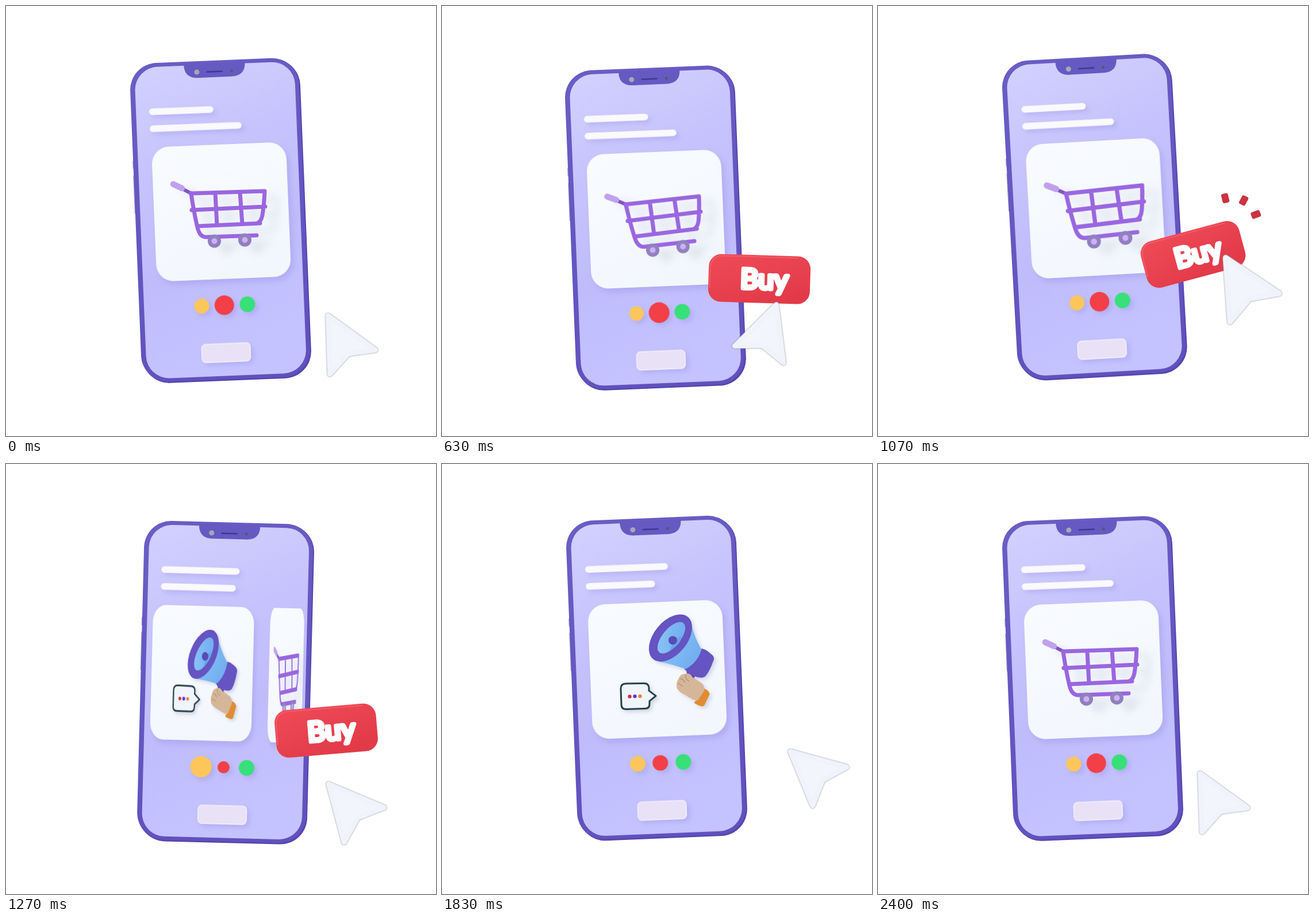
An HTML page for the animation above (2430 ms loop, 748 by 748 pixels).

```html
<!DOCTYPE html>
<html lang="en">
<head>
<meta charset="utf-8">
<title>Mobile shop</title>
<style>
  html, body { margin: 0; width: 100%; height: 100%; overflow: hidden; background: #fff; }
  svg { display: block; width: 100vw; height: 100vh; }
  .raised { filter: drop-shadow(5px 5px 4px #7f78d840); }
  .card { filter: drop-shadow(5px 7px 5px #7f78d840); }
  .art { filter: drop-shadow(22px 12px 7px #8d93b030); }
  .soft { filter: drop-shadow(4px 4px 3px #8d93b050); }
  .cursor { filter: drop-shadow(0 0 .8px #666b80); }
  .line { fill: none; stroke-linecap: round; stroke-linejoin: round; }
  text { font: 400 48px Lato, "Open Sans", sans-serif; letter-spacing: .5px; }
</style>
</head>
<body>
<svg viewBox="0 0 748 748">
  <defs>
    <linearGradient id="screen" x1=".1" y1="0" x2=".3" y2="1">
      <stop offset="0" stop-color="#d2d0fe"/>
      <stop offset=".35" stop-color="#c5c2fd"/>
      <stop offset=".65" stop-color="#bfbcfb"/>
      <stop offset="1" stop-color="#c4c3ff"/>
    </linearGradient>
    <linearGradient id="frame" x1="0" y1="0" x2=".2" y2="1">
      <stop offset="0" stop-color="#6a5dc4"/>
      <stop offset="1" stop-color="#6151be"/>
    </linearGradient>
    <linearGradient id="paper" x1="0" y1="0" x2=".4" y2="1">
      <stop offset="0" stop-color="#f9fbff"/>
      <stop offset="1" stop-color="#f3f7fd"/>
    </linearGradient>
    <linearGradient id="red" x1="0" y1="0" x2=".6" y2="1">
      <stop offset="0" stop-color="#f04a57"/>
      <stop offset="1" stop-color="#e23a49"/>
    </linearGradient>
    <linearGradient id="sky" x1="0" y1="0" x2="1" y2=".6">
      <stop offset="0" stop-color="#8cc6f8"/>
      <stop offset="1" stop-color="#72aef0"/>
    </linearGradient>
  </defs>

  <g id="phone">
    <path d="M-148-110v14M-148-84v66" stroke="#aaa5cf" stroke-width="2"/>
    <rect x="-146" y="-277" width="294" height="556" rx="47" fill="#5546ae"/>
    <rect x="-148" y="-278.5" width="294" height="555" rx="47" fill="url(#frame)"/>
    <rect x="-139.500" y="-271.500" width="278.500" height="542" rx="40" fill="url(#screen)"/>
    <path d="M-53-275V-269Q-51-249.500-29-249.500H29Q51-249.500 53-269V-275Z" fill="#6659c2"/>
    <circle cx="-31" cy="-259.500" r="4.500" fill="#a9a7b5"/>
    <path class="line" d="M-13-259.200H13" stroke="#433792" stroke-width="2.600"/>
    <circle cx="29.500" cy="-259.200" r="2.600" fill="#5b566f"/>

    <path id="line1" class="line raised" stroke="#f9f9fe" stroke-width="11.500"/>
    <path id="line2" class="line raised" stroke="#f9f9fe" stroke-width="11.500"/>

    <g id="cart">
      <rect class="card" x="-117" y="-117" width="234" height="234" rx="30" fill="url(#paper)"/>
      <g transform="rotate(2.350) translate(-374.600 -358)">
        <g id="trolley" class="art">
          <g class="line" stroke="#9a66e0" stroke-width="7">
            <path d="M303 316L322 326" stroke="#8450c4" stroke-width="6"/>
            <path d="M322 326L450 322Q449 346 446 364Q444 375 437 378M323 355L451 349M334 383L442 378M364 325L367 381M407 324L411 379"/>
            <path d="M322 326Q327 360 333 385Q337 403 350 402L436 399"/>
            <path d="M291 310L306 317" stroke="#bfa1ee" stroke-width="10.500"/>
          </g>
          <g fill="#cdb1f5" stroke="#9080bf" stroke-width="6.500">
            <circle cx="362.500" cy="409" r="8.300"/>
            <circle cx="415.500" cy="407" r="8.300"/>
          </g>
        </g>
      </g>
    </g>

    <g id="ad">
      <rect class="card" x="-117" y="-117" width="234" height="234" rx="30" fill="url(#paper)"/>
      <g transform="rotate(2.350) translate(-374.600 -371)">
        <g class="soft">
          <path class="line" d="M320 395.500L351 395Q360 395 360 403V408L372 417L361 426V431Q361 439 353 439L320 440Q312 440 312 432L311 404Q311 396 320 395.500Z" style="fill:#f0f4fb" stroke="#26404b" stroke-width="3"/>
          <circle cx="326.500" cy="418" r="3.200" fill="#d02f48"/>
          <circle cx="335.500" cy="417.700" r="3.200" fill="#5f35cf"/>
          <circle cx="344.500" cy="417.500" r="3.200" fill="#df8a38"/>
        </g>
        <g id="horn" class="soft">
          <path d="M426 362L444 370L440 388L430 380Z" fill="#5c4cb8"/>
          <path d="M452 332Q456 327 472 341Q478 346 474 353Q469 368 462 377Q457 384 443 379Q432 374 424 366Z" fill="#6654c2"/>
          <path d="M436 288Q443 314 454 332Q447 355 426 366Q405 358 380 353Z" fill="url(#sky)"/>
          <ellipse cx="400" cy="312" rx="47.500" ry="29" transform="rotate(-50.500 400 312)" fill="#6554c1"/>
          <ellipse cx="401.500" cy="311.500" rx="33" ry="15.500" transform="rotate(-50.500 401.500 311.500)" fill="url(#sky)"/>
          <path d="M405 316L420 307Q419 322 399 334Z" fill="#69a6e8"/>
          <circle cx="404" cy="316" r="7.500" fill="#5a4bb5"/>
          <path d="M459 400Q468 404 468 410L459 429Q456 434 441 425Z" fill="#e08c33"/>
          <path d="M411 399Q409 390 414 383Q417 374 426 374Q434 372 438 380L455 391Q460 396 458 405L447 421Q441 421 424 410Q416 407 411 399Z" fill="#d5b699"/>
          <path class="line" d="M414 391L421 396M417 383Q422 383 425 389M427 376Q425 383 432 387" stroke="#b69478" stroke-width="1.500"/>
        </g>
      </g>
    </g>

    <g class="raised">
      <circle id="yellow" cx="-39" cy="147.600" fill="#fdc65a"/>
      <circle id="rose" cx=".2" cy="147.600" fill="#f23f48"/>
      <circle cx="40.300" cy="147.600" r="13.500" fill="#37e078"/>
    </g>
    <rect class="raised" x="-42" y="214.500" width="84" height="31.500" rx="7" fill="#e9e1f6" stroke="#f1ecfa" stroke-width="2"/>
  </g>

  <g id="cubes" fill="#a195ec"></g>
  <g id="sparks" fill="#cb3242"></g>

  <g id="buy">
    <rect x="-88.500" y="-41.500" width="177" height="83" rx="22" fill="url(#red)"/>
    <path class="line" d="M-86 17V-18Q-84-38-66-38.500H66" stroke="#f4707a" stroke-width="2" opacity=".5"/>
    <text x="9" y="17" text-anchor="middle" fill="#fff" stroke="#fff" stroke-width="7" stroke-linejoin="round" stroke-linecap="round">Buy</text>
  </g>

  <path id="cursor" class="cursor" d="M4.500 0L86 40L71.500 0L86-40Z" fill="#f2f5fc" stroke="#f0f3fa" stroke-width="8" stroke-linejoin="round"/>
</svg>

<script>
const LOOP = 2430, END = 2400;
const $ = id => document.getElementById(id);
const place = (id, value) => $(id).setAttribute('transform', value);
const mix = (a, b, p) => a + (b - a) * p;
const clamp = (t, from, to) => Math.min(1, Math.max(0, (t - from) / (to - from)));
const smooth = (t, from, to) => { const u = clamp(t, from, to); return u * u * (3 - 2 * u); };
const wave = (t, from, length) => Math.sin(2 * Math.PI * clamp(t, from, from + length));
const bump = (t, mid, half) => Math.cos(Math.PI / 2 * Math.min(1, Math.abs(t - mid) / half)) ** 2;

// Closed Catmull-Rom curve through a few rows of [time, ...values].
function curve(...rows) {
  const n = rows.length;
  const at = k => {
    const turns = Math.floor(k / n), [time, ...values] = rows[k - turns * n];
    return [time + turns * END, ...values];
  };
  return t => {
    let k = 0;
    while (at(k + 1)[0] <= t) k++;
    const [p, a, b, q] = [k - 1, k, k + 1, k + 2].map(at);
    const h = b[0] - a[0], u = (t - a[0]) / h, v = 1 - u;
    return a.map((_, j) => {
      const out = (b[j] - p[j]) / (b[0] - p[0]), into = (q[j] - a[j]) / (q[0] - a[0]);
      return a[j] * v * v * (1 + 2 * u) + b[j] * u * u * (3 - 2 * u) + h * u * v * (out * v - into * u);
    }).slice(1);
  };
}

const bob = curve([0, 0], [630, 13], [930, -12], [1070, -6], [1270, 7], [1630, 13], [2030, -13]);
const radii = curve([0, 13, 17], [1070, 13, 17], [1270, 18.5, 10.5], [1630, 16.5, 13], [2030, 11, 14]);
// x, y, rotation
const pointer = curve([0, 558, 534, 62], [290, 537, 586, 84], [630, 583, 515, 109],
  [1070, 602, 433, 60], [1270, 558, 553, 49], [1630, 586, 532, 32], [2030, 608, 473, 54]);

// Three small blocks fanning out from a point.
function burst(id, cx, cy, first, step, reach, w, h, start) {
  const blocks = [0, 1, 2].map(() => {
    const block = document.createElementNS('http://www.w3.org/2000/svg', 'rect');
    Object.entries({ x: -w / 2, y: -h / 2, width: w, height: h, rx: 3.2 })
      .forEach(([key, value]) => block.setAttribute(key, value));
    return $(id).appendChild(block);
  });
  return t => {
    const travel = reach * smooth(t, start, start + 140);
    const size = smooth(t, start, start + 120) - smooth(t, start + 170, start + 280);
    blocks.forEach((block, i) => block.setAttribute('transform',
      `translate(${cx} ${cy}) rotate(${first + step * i}) translate(${travel} 0) scale(${size})`));
  };
}
const sparks = burst('sparks', 615, 378, -104, 42, 45, 16.5, 12, 930);
const cubes = burst('cubes', 400, 300, 178, 31, 59, 10, 11, 1490);

// Squeeze a card between two edges.
function card(id, left, right) {
  const s = (right - left) / 234;
  $(id).style.display = s < .005 ? 'none' : '';
  place(id, `translate(${(left + right) / 2 + 1.7} -15) scale(${s} 1)`);
}

function render(t) {
  // 0 shows the cart, 1 shows the megaphone
  const slide = 1 - (1 - clamp(t, 1070, 1470)) ** 2 - smooth(t, 1995, 2390);

  const sway = 9 * wave(t, 600, 840), tilt = 4 * wave(t, 680, 840);
  place('phone', `translate(${373.5 - sway} ${373 + bob(t)[0]}) rotate(${-2.35 - tilt})`);

  const divider = mix(-117, 117, slide), gap = Math.sin(Math.PI * slide);
  card('cart', divider + 20 * gap, 117 + 22 * gap);
  card('ad', -117 - 20 * gap, divider - 20 * gap);

  const lean = smooth(t, 0, 600) - smooth(t, 1500, 1600);
  const grow = smooth(t, 630, 1070) - smooth(t, 1500, 1600);
  place('trolley', `translate(290 310) scale(${1 + .045 * grow}) translate(-290 -310) rotate(${grow - 4.5 * lean} 400 332)`);

  const low = 1 - smooth(t, 1200, 1630), sink = low + .5 * smooth(t, 1630, 2030);
  place('horn', `translate(${-10 * sink} ${17 * sink}) rotate(${-10 * low} 455 416)`);

  $('line1').setAttribute('d', `M-111-193.7L${mix(-10.6, 21.5, slide)}-193.6`);
  $('line2').setAttribute('d', `M-111-164.2L${mix(37.3, -2, slide)}-164.1`);
  const [yellow, rose] = radii(t);
  $('yellow').setAttribute('r', yellow);
  $('rose').setAttribute('r', rose);

  const press = bump(t, 1060, 320), shrink = smooth(t, 1380, 1665);
  const size = smooth(t, 180, 520) - shrink;
  $('buy').style.display = size < .005 ? 'none' : '';
  place('buy', `translate(${552 - 4 * press + 8 * slide} ${475 - 43 * press - 31 * shrink})
    rotate(${1.8 - 16.8 * press - 3 * slide}) scale(${size})`);

  const [x, y, turn] = pointer(t);
  place('cursor', `translate(${x} ${y}) rotate(${turn}) scale(${mix(1.12, 1.23, press)})`);
  sparks(t);
  cubes(t);
}

const start = performance.now();
function tick() {
  render(Math.min((performance.now() - start) % LOOP, END));
  requestAnimationFrame(tick);
}
tick();
</script>
</body>
</html>
```
